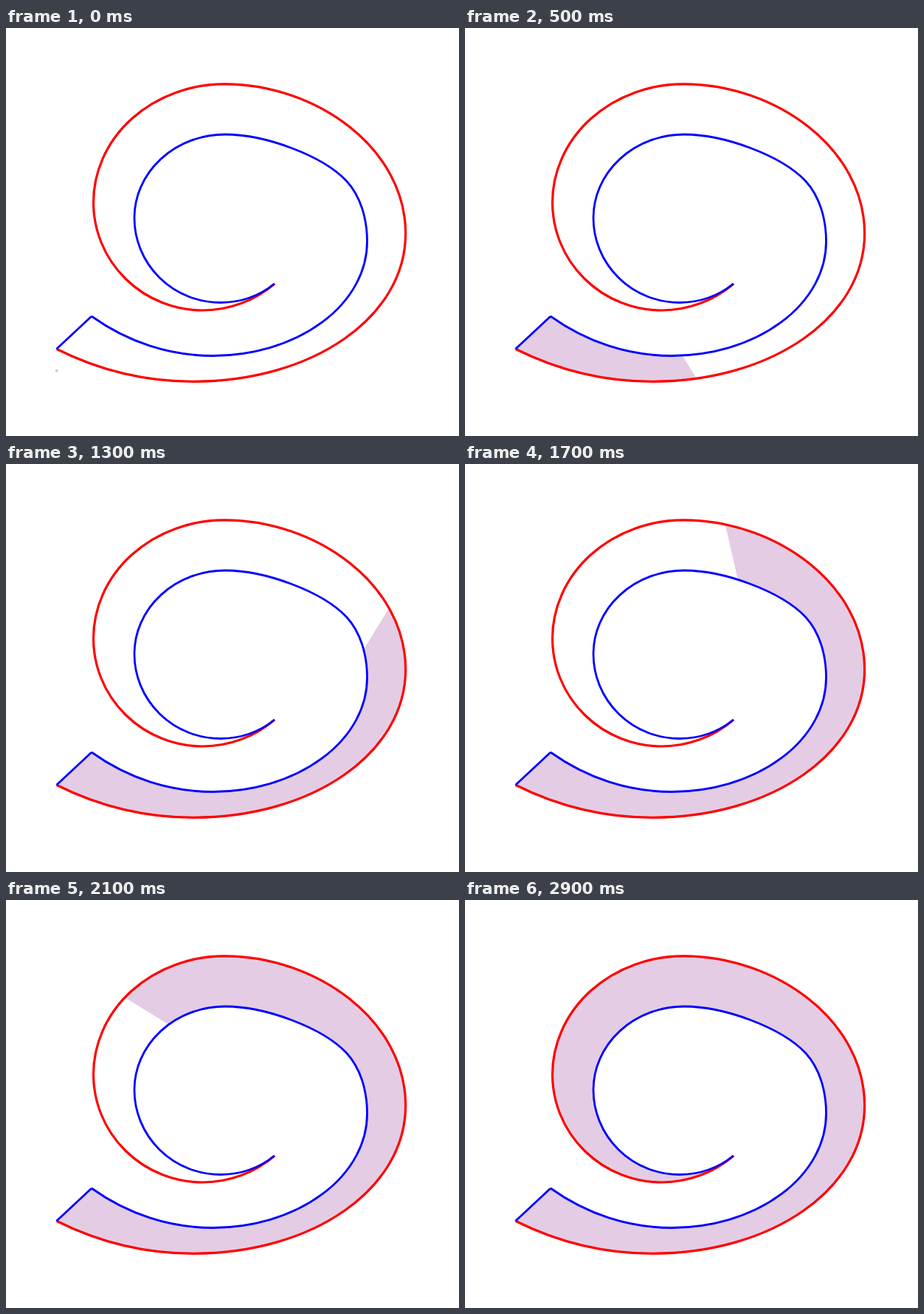
These frames come from a looping animation (614x552 px, 3000 ms). An HTML page:

```html
<!DOCTYPE html>
<html>
<head>
<meta charset="utf-8">
<title>Area swept between two spirals</title>
<style>
  html, body { margin: 0; height: 100%; overflow: hidden; background: #fff; }
  svg { display: block; width: 614px; height: 552px; }
  path { fill: none; stroke-linejoin: round; }
</style>
</head>
<body>
<svg viewBox="0 0 614 552">
  <polygon id="area" fill="#e4cce4"/>
  <path id="outer" stroke="#f00" stroke-width="3.2" d="M68.5 434.2
    C125 462.4 188 478.3 254 478.3
    C416 478.3 541.6 391 541.6 278
    C541.6 163 421 75.9 296 75.9
    A177.5 160.1 0 0 0 118.5 236
    A148.5 146 0 0 0 267 382
    A148.5 146 0 0 0 364 346"/>
  <path stroke="#00f" stroke-width="2.8" d="M68.5 434.2L116 390"/>
  <path id="inner" stroke="#00f" stroke-width="2.8" d="M116 390
    C165 425 222 443.5 280.5 443.5
    A209 154.5 0 0 0 489.5 289
    C489.5 257 480 227 461.8 207.2
    C428 171.5 350 144 297 144
    A123 113 0 0 0 174 257
    A117 114.5 0 0 0 291 371.5
    A117 114.5 0 0 0 364 346"/>
  <circle id="dot" cx="68.7" cy="463.7" r="2" fill="#ccc"/>
</svg>
<script>
const STEPS = 30, STEP_MS = 100, SAMPLES = 300;
const START = 0.125;                          // step at which the sweep sets off
const OUTER_SPEED = 51.8, INNER_SPEED = 38.95; // pixels per step along each curve
const [area, outer, inner, dot] =
  ['area', 'outer', 'inner', 'dot'].map(id => document.getElementById(id));
let shown = -1;

// Points along the curve from its start up to the given distance.
function trace(path, distance) {
  const end = Math.min(distance, path.getTotalLength());
  return Array.from({ length: SAMPLES + 1 }, (_, i) => {
    const p = path.getPointAtLength(end * i / SAMPLES);
    return [p.x, p.y];
  });
}

function draw() {
  const step = Math.floor(performance.now() / STEP_MS) % STEPS;
  if (step !== shown) {
    shown = step;
    const swept = Math.max(0, step - START);
    const outline = step
      ? [...trace(outer, OUTER_SPEED * swept), ...trace(inner, INNER_SPEED * swept).reverse()]
      : [];
    area.setAttribute('points', outline.join(' '));
    dot.style.display = step ? 'none' : '';
  }
  requestAnimationFrame(draw);
}
draw();
</script>
</body>
</html>
```
